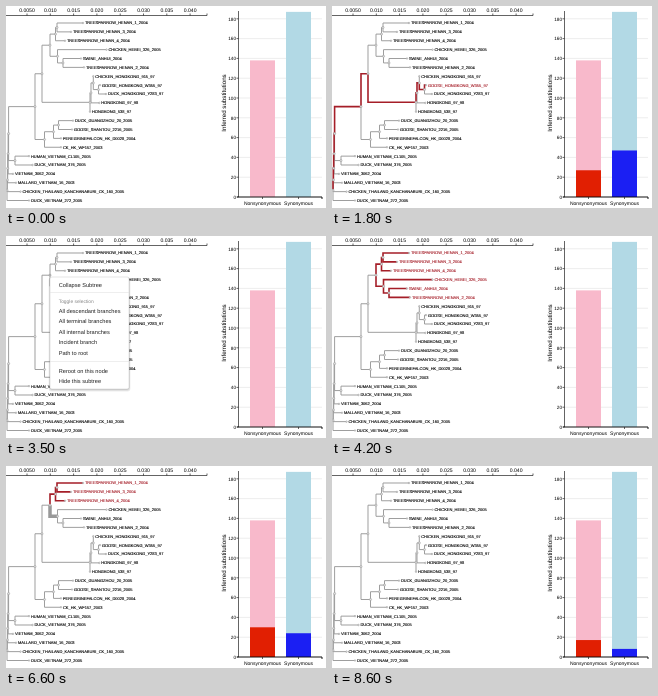
Animation, 320 px wide and 202 px high, one loop 8700 ms. Source, as an HTML page:

```html
<!DOCTYPE html>
<html lang="en">
<head>
<meta charset="utf-8">
<title>Tree branch selection</title>
<style>
  html, body { margin: 0; width: 100%; height: 100%; overflow: hidden; background: #fff; }
  svg {
    display: block; width: 100vw; height: 100vh;
    font-family: "Liberation Sans", Arial, sans-serif; text-rendering: geometricPrecision;
  }
</style>
</head>
<body>
<svg id="stage" viewBox="0 0 320 202"></svg>
<script>
const LOOP = 8700, STEP = 100, GROW = 500;
const RED = "#a51e28", GRAY = "#999", INK = "#000";
const stage = document.getElementById("stage");

function add(parent, tag, attrs, text) {
  const el = document.createElementNS("http://www.w3.org/2000/svg", tag);
  set(el, attrs);
  if (text !== undefined) el.textContent = text;
  parent.appendChild(el);
  return el;
}
function set(el, attrs) {
  for (const k in attrs) el.setAttribute(k, attrs[k]);
}
function label(parent, x, y, size, text, attrs = {}) {
  return add(parent, "text", { x, y, "font-size": size, fill: INK, ...attrs }, text);
}
function line(d, attrs = {}) {
  return add(stage, "path", { d, fill: "none", stroke: "#222", "stroke-width": 0.7, ...attrs });
}

// --- Tree: leaves are placed in reading order, parents sit midway between children
const nodes = [];
let leafCount = 0;
function leaf(name, x) {
  const n = { name, x, y: 17 + 8.875 * leafCount++, kids: [] };
  nodes.push(n);
  return n;
}
function join(x, a, b) {
  const n = { x, y: (a.y + b.y) / 2, kids: [a, b] };
  a.parent = b.parent = n;
  nodes.push(n);
  return n;
}

const upper = join(49.5,
  join(51, leaf("TREESPARROW_HENAN_1_2004", 77), leaf("TREESPARROW_HENAN_3_2004", 65)),
  leaf("TREESPARROW_HENAN_4_2004", 59));
const lower = join(51.5,
  leaf("CHICKEN_HEBEI_326_2005", 100.5),
  join(57, leaf("SWINE_ANHUI_2004", 75), leaf("TREESPARROW_HENAN_2_2004", 78)));
const clade = join(44, upper, lower);

const chick = leaf("CHICKEN_HONGKONG_915_97", 87.3);
const goose = leaf("GOOSE_HONGKONG_W355_97", 94);
const pair = join(92.5, goose, leaf("DUCK_HONGKONG_Y283_97", 100));
const hongkong = join(84,
  join(85, join(87.3, chick, pair), leaf("HONGKONG_97_98", 93.3)),
  leaf("HONGKONG_538_97", 84));
const north = join(36, clade, hongkong);

const south = join(38.5,
  join(47.5,
    join(52.5, leaf("DUCK_GUANGZHOU_20_2005", 67), leaf("GOOSE_SHANTOU_2216_2005", 66)),
    leaf("PEREGRINEFALCON_HK_D0028_2004", 55)),
  leaf("CK_HK_WF157_2003", 55));

let trunk = join(29, north, south);
trunk = join(2.6, trunk, join(9, leaf("HUMAN_VIETNAM_CL105_2005", 23), leaf("DUCK_VIETNAM_376_2005", 26.5)));
trunk = join(2.1, trunk, leaf("VIETNAM_3062_2004", 7));
trunk = join(1.7, trunk, leaf("MALLARD_VIETNAM_16_2003", 10));
trunk = join(1.3, trunk, leaf("CHICKEN_THAILAND_KANCHANABURI_CK_160_2005", 14.5));
join(1, trunk, leaf("DUCK_VIETNAM_272_2005", 23));

const under = n => n.kids.flatMap(k => [k, ...under(k)]);
const toRoot = n => n.parent ? [n, ...toRoot(n.parent)] : [];

// Each rule keeps its branches selected from one time to another
const picks = [
  { set: toRoot(goose), from: 1000, to: 2200 },
  { set: under(lower), from: 4200, to: 5700 },
  { set: [lower], from: 4200, to: 6600 },
  { set: [upper], from: 4200, to: 7200 },
  { set: under(upper), from: 4200, to: 8400 }
];
const hovers = [
  { node: lower, from: 6600, to: 6900 },
  { node: upper, from: 7000, to: 7600 }
];
const active = (o, t) => t >= o.from && t < o.to;

// --- Scale above the tree
line("M0 9.5H201V7.5");
for (let i = 0; i < 8; i++) {
  const x = 21 + 23.3 * i;
  line(`M${x} 9.5V7.5`);
  label(stage, x, 5.6, 5.1, i ? (0.005 * (i + 1)).toFixed(3) : "0.0050", { "text-anchor": "middle" });
}

for (const n of nodes) {
  if (n.parent) n.branch = line(`M${n.parent.x} ${n.parent.y}V${n.y}H${n.x}`);
}
for (const n of nodes) {
  n.dot = add(stage, "circle", {
    cx: n.x, cy: n.y, r: n.name ? 0.8 : 1.1,
    fill: "#ddd", stroke: GRAY, "stroke-width": 0.5
  });
  if (n.name) n.text = label(stage, n.x + 1.9, n.y + 1.4, 4, n.name, { "stroke-width": 0.12 });
}

// --- Bar chart
const BASE = 191, UNIT = 0.99;
const yOf = v => BASE - v * UNIT;
function bar(x, fill, value = 0) {
  const el = add(stage, "rect", { x, width: 25, fill });
  sizeBar(el, value);
  return el;
}
function sizeBar(el, value) {
  set(el, { y: yOf(value), height: value * UNIT });
}
for (let v = 0; v <= 180; v += 20) {
  line(`M232.5 ${yOf(v)}H316`, { stroke: "#e6e6e6" });
  line(`M232.5 ${yOf(v)}h-2`);
  label(stage, 230, yOf(v) + 1.7, 4.7, v, { "text-anchor": "end" });
}
bar(244, "#f8b9cb", 138);
bar(280, "#b2d9e5", 187);
const nonBar = bar(244, "#e11f02");
const synBar = bar(280, "#1b1ff3");

line(`M232.5 5V${BASE}`);
line(`M231 ${BASE}H316v2`, { stroke: INK, "stroke-width": 0.9 });
for (const x of [256.5, 292.5]) line(`M${x} ${BASE}v2`);
label(stage, 256.5, 199, 5, "Nonsynonymous", { "text-anchor": "middle" });
label(stage, 292.5, 199, 5, "Synonymous", { "text-anchor": "middle" });
label(stage, 0, 0, 6.2, "Inferred substitutions", {
  "text-anchor": "middle", transform: "translate(219.6 97) rotate(-90)"
});

// --- Context menus
function menu(x, y, from, to, isLeaf) {
  const g = add(stage, "g", { transform: `translate(${x} ${y})` });
  const lift = isLeaf ? 17 : 0, height = 112 - lift;
  for (const s of [2, 1.2, 0.5]) {
    add(g, "rect", {
      x: -s * 0.7, y: 0.5, width: 79 + s * 1.4, height: height + s,
      rx: 2.4, fill: "#000", opacity: 0.07
    });
  }
  add(g, "rect", {
    width: 79, height, rx: 1.8, fill: "#fff", stroke: "#bbb", "stroke-width": 0.4
  });
  const rule = at => add(g, "path", { d: `M0 ${at - lift}H79`, stroke: "#ddd", "stroke-width": 0.5 });
  const item = (at, text) => label(g, 8.7, at + 2 - lift, 5.65, text, { fill: "#222" });
  if (!isLeaf) {
    item(7.5, "Collapse Subtree");
    rule(15.5);
  }
  label(g, 8.7, 25.7 - lift, 4.9, "Toggle selection", { fill: "#888" });
  ["All descendant branches", "All terminal branches", "All internal branches",
    "Incident branch", "Path to root"].forEach((s, i) => item(34 + 10.4 * i, s));
  rule(84.5);
  item(94, "Reroot on this node");
  item(104.3, "Hide this subtree");
  return { g, from, to };
}
const menus = [
  menu(149, 78, 200, 1000, true),
  menu(44, 41, 3500, 4100),
  menu(53, 53, 4900, 5700),
  menu(51, 31, 7900, 8400)
];

// --- Selected counts: start time, nonsynonymous, synonymous
const counts = [
  [1050, 27, 47], [2200, 0, 0], [4250, 65, 56],
  [5750, 30, 24], [6600, 26, 15], [7200, 23, 11], [8400, 0, 0]
];
const ease = p => p < 0.5 ? 4 * p ** 3 : 1 - 4 * (1 - p) ** 3;
function countAt(t, col) {
  let value = 0;
  for (const row of counts) {
    const p = Math.min(1, Math.max(0, (t - row[0]) / GROW));
    value += (row[col] - value) * ease(p);
  }
  return value;
}

function draw(t) {
  const selected = new Set(picks.filter(p => active(p, t)).flatMap(p => p.set));
  const hovered = new Set(hovers.filter(h => active(h, t)).map(h => h.node));
  for (const n of nodes) {
    const on = selected.has(n);
    if (n.branch) {
      set(n.branch, {
        stroke: on ? RED : GRAY,
        "stroke-width": hovered.has(n) ? 3.5 : on ? 1.6 : 0.95
      });
    }
    if (n.text) {
      const color = on ? RED : INK;
      set(n.text, { fill: color, stroke: color });
    }
  }
  clade.dot.setAttribute("fill", t >= 3300 && t < 4100 ? "#bbb" : "#ddd");
  sizeBar(nonBar, countAt(t, 1));
  sizeBar(synBar, countAt(t, 2));
  for (const m of menus) m.g.setAttribute("display", active(m, t) ? "inline" : "none");
}

const start = performance.now();
function tick() {
  const t = (performance.now() - start) % LOOP;
  draw(Math.floor(t / STEP) * STEP);
  requestAnimationFrame(tick);
}
tick();
</script>
</body>
</html>
```
